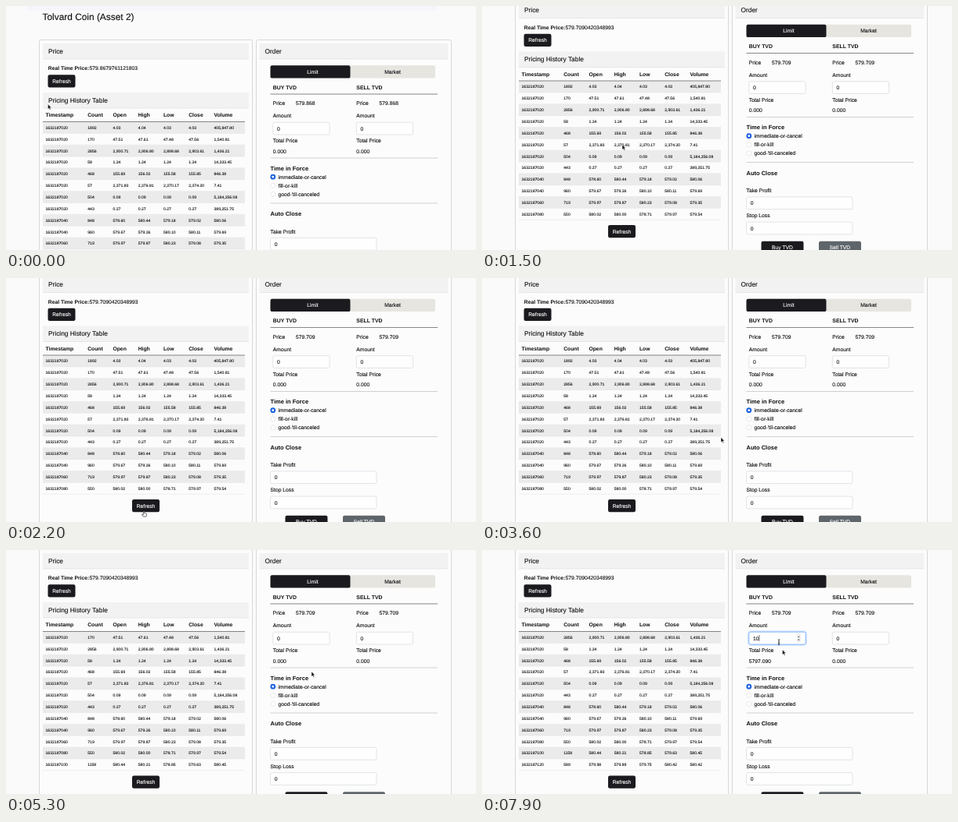
Write an HTML page that moves like this. It is 600 px wide and 313 px high and loops after 8000 ms.

```html
<!DOCTYPE html>
<html lang="en">
<head>
<meta charset="utf-8">
<title>Trading form</title>
<style>
  html, body { margin: 0; width: 100%; height: 100%; overflow: hidden; background: #fafafa; }
  svg { display: block; width: 100%; height: 100%; }
  text { font-family: "Liberation Sans", Arial, sans-serif; fill: #0c0c0e; stroke: #0c0c0e; stroke-width: .1px; text-rendering: geometricPrecision; white-space: pre; }
  .b { font-weight: bold; stroke: none; }
  .mid { text-anchor: middle; }
  .light { fill: #fff; stroke: #fff; }
</style>
</head>
<body>
<svg id="stage" viewBox="0 0 600 313" preserveAspectRatio="none"></svg>
<script>
const LOOP = 8000, STEP = 100;
const INK = '#1b1b1f', HOVER = '#38383d';
const ROWS = 12, ROW_H = 14.85, ROW_TOP = 148.5;
const HEADS = 'Timestamp Count Open High Low Close Volume'.split(' ');
const colX = i => i ? 72 + 32.25 * i : 50.5;

// start, end, then the values reached
const POINTER = [
  [0, 0, 53.5, 126], [0, 300, 72, 96], [800, 1500, 179, 178], [1700, 2200, 176, 299],
  [2200, 2400, 176, 290], [2700, 3100, 288, 229], [3400, 3600, 305, 204.5],
  [3700, 4100, 178, 300], [4100, 4300, 180.5, 309], [4300, 4900, 180, 297],
  [5000, 5300, 390, 156], [5800, 6300, 399.5, 80.5], [6700, 7000, 388, 166],
  [7000, 7200, 379, 114.5], [7800, 7900, 383.5, 128]
];
const SCROLL = [[0, 0, 0], [800, 1500, 52.5], [1700, 2200, 49.5], [3700, 4200, 44]];
const PRICE_AT = 500, REFRESH_AT = [3900, 5900], FOCUS_AT = 7200, KEY_MS = 200;

let seed = 7;
const rand = () => (seed = seed * 16807 % 2147483647) / 2147483647;
const money = n => n.toLocaleString('en-US', { minimumFractionDigits: 2, maximumFractionDigits: 2 });

// count, opening price and volume of the other assets
const ASSETS = [
  [1892, 4.03, 405847.8], [170, 47.51, 1540.81], [2856, 2900.71, 1436.21], [58, 1.24, 14333.45],
  [468, 155.69, 846.38], [57, 2371.83, 7.41], [504, 0.09, 5184256.08], [443, 0.27, 389251.75]
];
const TICKS = [848, 960, 719, 550, 1158, 589];
const stamp = i => String(1632187000 + 20 * (i < ASSETS.length ? 1 : Math.max(2, i - 7)));
const DATA = [
  ...ASSETS.map(([n, open, vol]) => [n, ...[1, 1.0021, 0.9993, 1.001].map(k => money(open * k)), money(vol)]),
  ...TICKS.map(n => [n, ...Array.from({ length: 5 }, () => money(578.6 + 2 * rand()))])
].map((row, i) => [stamp(i), ...row]);

const stage = document.getElementById('stage');

function add(parent, tag, attrs, content) {
  const node = document.createElementNS('http://www.w3.org/2000/svg', tag);
  for (const k in attrs) node.setAttribute(k, attrs[k]);
  if (content !== undefined) node.textContent = content;
  parent.appendChild(node);
  return node;
}
const group = parent => add(parent, 'g', {});
const page = group(stage);

// y is the middle of the capitals
function label(x, y, content, cls = '', size = 6.75) {
  return add(page, 'text', { x, y: y + size * 0.36, class: cls, 'font-size': size }, content);
}
const box = (x, y, width, height, fill, more = {}) =>
  add(page, 'rect', { x, y, width, height, fill, ...more });
const rule = (x1, x2, y, stroke, w = 0.6) =>
  add(page, 'line', { x1, x2, y1: y, y2: y, stroke, 'stroke-width': w });

function panel(x, w) {
  box(x, 43.5, w, 400, '#fcfcfc', { rx: 2, stroke: '#cfcfcf', 'stroke-width': 0.8 });
}
function heading(x, y, w, content) {
  box(x, y, w, 20, '#f2f2f2');
  rule(x, x + w, y + 20, '#dcdcdc');
  label(x + 7, y + 9.6, content, '', 8.35);
}
function button(x, y, w, content, fill = INK) {
  const face = box(x, y, w, 16.2, fill, { rx: 2.2 });
  label(x + w / 2, y + 8.1, content, 'mid light');
  return { face, x, y, w, h: 16.2 };
}
function field(x, y, w) {
  const face = box(x, y, w, 15.8, '#fefefe', { rx: 2, stroke: '#d5d9de', 'stroke-width': 0.7 });
  return { face, x, y, w, h: 15.8, value: label(x + 5.2, y + 8.1, '0') };
}

box(27, 0, 523, 6, '#f5f5fc');
label(46.5, 14, 'Tolvard Coin (Asset 2)', '', 11.9);

// left panel
panel(42.5, 272);
heading(47, 48, 263, 'Price');
label(53.8, 80, 'Real Time Price:', 'b');
const live = label(106.5, 80, '');
const topButton = button(53.5, 88.3, 35, 'Refresh');
heading(47, 111, 263, 'Pricing History Table');
HEADS.forEach((h, i) => label(colX(i), 140, h, 'b'));
const cells = Array.from({ length: ROWS }, (_, r) => {
  const y = ROW_TOP + r * ROW_H;
  if (r % 2 === 0) box(47, y, 258, ROW_H, '#ebebeb');
  rule(47, 305, y + ROW_H, '#dcdfe3', 0.5);
  return HEADS.map((_, i) => label(colX(i), y + 7.6, '', '', 5.1));
});
rule(47, 305, ROW_TOP, '#55555a', 0.7);
const lowButton = button(161, 333.6, 35, 'Refresh');

// right panel
panel(319.5, 249);
heading(323.5, 48, 241, 'Order');
box(337.5, 76.2, 210.5, 16.4, '#e7e5e0', { rx: 2.2 });
box(337.5, 76.2, 102, 16.4, INK, { rx: 2.2 });
label(391.5, 84.4, 'Limit', 'mid light');
label(493.5, 84.4, 'Market', 'mid');
rule(337.5, 551, 113, '#55555a', 0.7);

function side(x, name) {
  label(x, 104.5, name + ' TVD', 'b', 6.9);
  label(x, 125, 'Price');
  const price = label(x + 29.3, 125, '');
  label(x, 141, 'Amount');
  const amount = field(x, 149.2, 72.3);
  label(x, 173, 'Total Price');
  return { price, amount, total: label(x, 186.2, '0.000') };
}
const buy = side(340.8, 'BUY'), sell = side(447.3, 'SELL');

rule(337.5, 551, 195, '#b4b4b8');
label(337.5, 208, 'Time in Force', 'b', 7.5);
['immediate-or-cancel', 'fill-or-kill', "good-'til-canceled"].forEach((name, i) => {
  const cy = 219.2 + i * 11.1;
  add(page, 'circle', i
    ? { cx: 340.8, cy, r: 3.1, fill: '#fff', stroke: '#d8dadd', 'stroke-width': 0.6 }
    : { cx: 340.8, cy, r: 2.4, fill: '#fff', stroke: '#1c62e0', 'stroke-width': 2 });
  label(347.5, cy, name);
});
rule(337.5, 551, 253, '#b4b4b8');
label(337.5, 266.7, 'Auto Close', 'b', 7.5);
['Take Profit', 'Stop Loss'].forEach((name, i) => {
  label(337.5, 289.3 + i * 32.2, name);
  field(337.5, 297.4 + i * 32.2, 135.5);
});
button(356.5, 354.2, 54, 'Buy TVD');
button(430, 354.2, 54, 'Sell TVD', '#5f666b');

// number stepper and caret of the focused field
const focus = group(page);
add(focus, 'rect', { x: 401.5, y: 152, width: 5.6, height: 10.4, rx: 1, fill: '#efefef' });
add(focus, 'path', { d: 'M403 156L404.3 154.2L405.6 156ZM403 158.6L404.3 160.4L405.6 158.6Z', fill: '#555' });
const caret = add(focus, 'rect', { y: 153, width: 0.6, height: 8, fill: '#222' });

const shapes = { arrow: group(stage), hand: group(stage), beam: group(stage) };
add(shapes.arrow, 'path', { d: 'M0 0V6.3L1.5 5L2.5 7.3L3.5 6.9L2.5 4.6H4.5Z', fill: '#111', stroke: '#fff', 'stroke-width': 0.4 });
add(shapes.hand, 'path', {
  d: 'M-.6 .3Q0-.5 .6 .3V2.6L3.2 3.2Q3.8 3.5 3.6 4.6L3 7H-.6L-2.6 4.4Q-2.2 3.5-.6 4.6Z',
  fill: '#fff', stroke: '#111', 'stroke-width': 0.6
});
add(shapes.beam, 'path', { d: 'M-1.3 0Q0 0 0 1V6.5Q0 7.5-1.3 7.5M1.3 0Q0 0 0 1V6.5Q0 7.5 1.3 7.5M-.8 5H.8', fill: 'none', stroke: '#222', 'stroke-width': 0.6 });

function at(moves, t) {
  let value = moves[0].slice(2);
  for (const [start, end, ...to] of moves) {
    if (t < start) break;
    const p = end > start ? Math.min(1, (t - start) / (end - start)) : 1;
    const e = p * p * (3 - 2 * p);
    value = value.map((v, k) => v + (to[k] - v) * e);
  }
  return value;
}

function over(area, t) {
  const [x, y] = at(POINTER, t), py = y + at(SCROLL, t)[0];
  return x >= area.x && x <= area.x + area.w && py >= area.y && py <= area.y + area.h;
}
function place(name, [x, y]) {
  shapes[name].setAttribute('transform', `translate(${x} ${y})`);
  shapes[name].style.display = '';
}

function draw(t) {
  page.setAttribute('transform', `translate(0 ${-at(SCROLL, t)[0]})`);

  const first = REFRESH_AT.filter(time => t >= time).length;
  cells.forEach((row, r) => row.forEach((cell, c) => { cell.textContent = DATA[first + r][c]; }));

  const quote = t < PRICE_AT ? '579.8679761121803' : '579.7090420348993';
  const price = Number(quote).toFixed(3);
  live.textContent = quote;
  buy.price.textContent = sell.price.textContent = price;

  // hover colour trails the pointer a little
  for (const b of [topButton, lowButton]) b.face.setAttribute('fill', over(b, t - 150) ? HOVER : INK);

  const focused = t >= FOCUS_AT;
  const keys = Math.max(0, Math.floor((t - FOCUS_AT) / KEY_MS));
  const amount = '10'.slice(0, keys) || '0';
  buy.amount.value.textContent = amount;
  buy.total.textContent = (amount * price).toFixed(3);
  buy.amount.face.setAttribute('style', focused
    ? 'stroke:#86b7fe;stroke-width:.8;filter:drop-shadow(0 0 1.2px #5c9dfd)' : '');
  focus.style.display = focused ? '' : 'none';
  caret.setAttribute('x', 346.2 + 3.75 * amount.length);

  for (const k in shapes) shapes[k].style.display = 'none';
  // the text beam lingers for one step after the pointer leaves
  if (over(buy.amount, t - STEP)) place('beam', at(POINTER, t - STEP));
  const shape = over(buy.amount, t) ? 'beam'
    : over(topButton, t) || over(lowButton, t) ? 'hand' : 'arrow';
  place(shape, at(POINTER, t));
}

let start, last = -1;
function tick(now) {
  start ??= now;
  const t = Math.floor(((now - start) % LOOP) / STEP) * STEP;
  if (t !== last) draw(last = t);
  requestAnimationFrame(tick);
}
draw(0);
requestAnimationFrame(tick);
</script>
</body>
</html>
```
